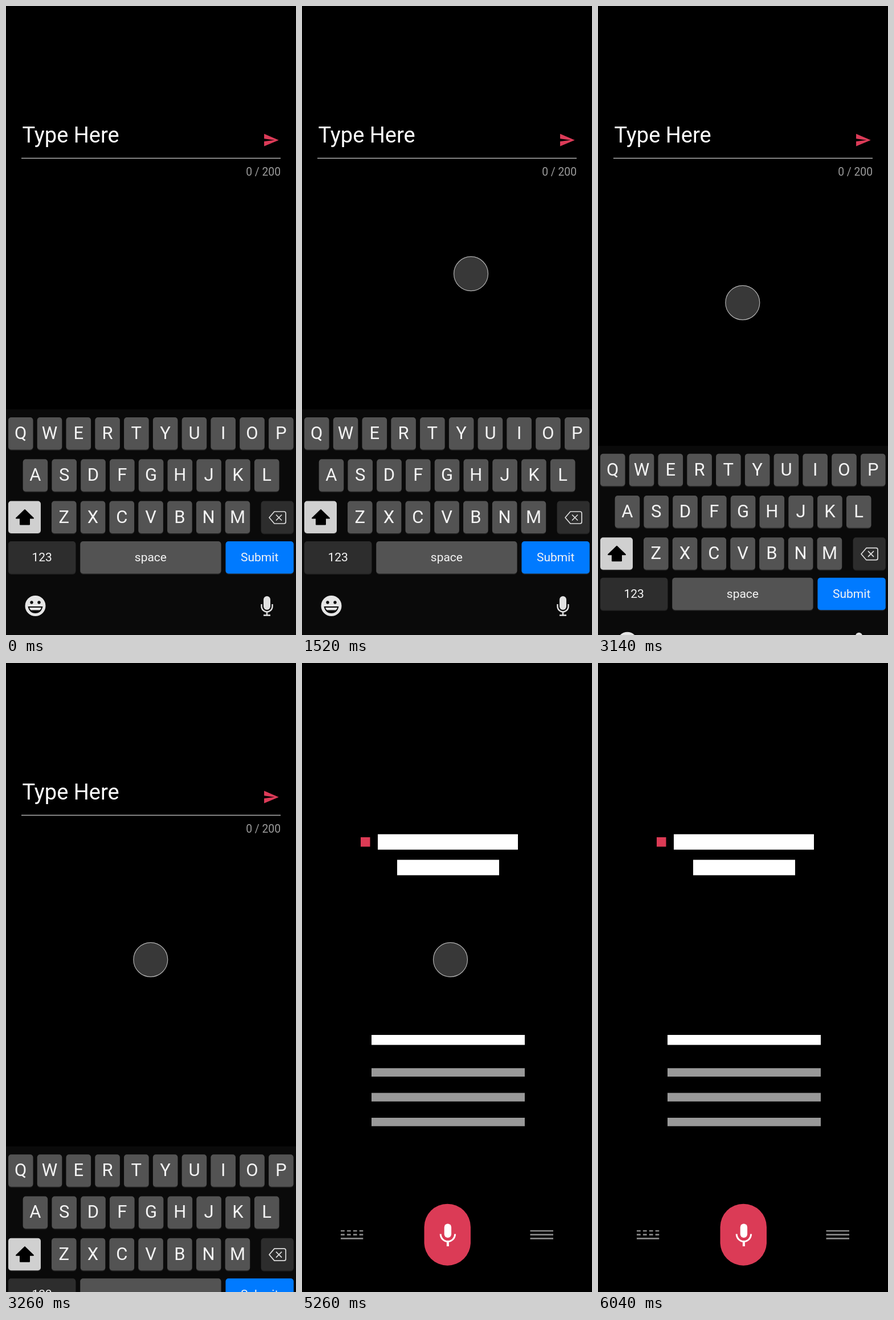
Recreate the animation shown at these times as an HTML page. Size 509 px wide and 1101 px high, loop 6.44 s.

```html
<!DOCTYPE html>
<html lang="en">
<head>
<meta charset="utf-8">
<title>Keyboard to voice input</title>
<style>
html, body { margin: 0; width: 100%; height: 100%; overflow: hidden; background: #000; }
svg { display: block; width: 509px; height: 1101px; font-family: Roboto, Arial, sans-serif; }
#keys text { text-anchor: middle; fill: #f4f4f4; }
.letter { font-size: 31px; }
.label { font-size: 21px; }
</style>
</head>
<body>
<svg viewBox="0 0 509 1101">
  <rect width="509" height="1101"/>

  <g id="typing">
    <text x="28.5" y="239" font-size="38" fill="#fff">Type Here</text>
    <path d="M27 266.5H482" stroke="#b0b0b0" stroke-width="1.3"/>
    <text x="482" y="297" font-size="19.3" fill="#9c9c9c" text-anchor="end">0 / 200</text>
    <path transform="translate(450.6 220) scale(1.22)" fill="#dc3b58" d="M2 21L23 12 2 3V10L17 12 2 14z"/>
    <g id="board">
      <rect y="706" width="509" height="395" fill="#0a0a0a"/>
      <g id="keys"></g>
      <path d="M33 882L48 896.5H41V907.5H25V896.5H18Z" stroke="#000" stroke-width="2" stroke-linejoin="round"/>
      <path d="M471 885H488Q491 885 491 888V903Q491 906 488 906H471L462 895.5ZM474 890.5L484 900.5M484 890.5L474 900.5"
        fill="none" stroke="#ddd" stroke-width="1.7" stroke-linejoin="round"/>
      <circle cx="51.5" cy="1050" r="18" fill="#e6e6e6"/>
      <g fill="#0a0a0a">
        <circle cx="45" cy="1044" r="2.7"/>
        <circle cx="58" cy="1044" r="2.7"/>
        <path d="M38.5 1051H64.5Q62 1063 51.5 1063T38.5 1051Z"/>
      </g>
      <path d="M41 1053H62Q61 1056.5 59 1057.5H44Q42 1056.5 41 1053Z" fill="#e6e6e6"/>
      <rect x="452" y="1033" width="12" height="24" rx="6" fill="#e2e2e2"/>
      <path d="M448.5 1047V1051A9.5 9.5 0 0 0 467.5 1051V1047M458 1060.5V1066M452 1066.5H464"
        fill="none" stroke="#e2e2e2" stroke-width="2.4"/>
    </g>
  </g>

  <g id="voice">
    <rect width="509" height="1101"/>
    <rect x="103" y="305" width="16.5" height="16.5" fill="#dc3b55"/>
    <g fill="#fff">
      <rect x="133" y="299.7" width="246" height="27"/>
      <rect x="167" y="344.5" width="179" height="27"/>
      <rect x="122" y="651" width="269" height="17.5"/>
    </g>
    <path d="M122 716.7H391M122 760H391M122 803.3H391" stroke="#999" stroke-width="14.8"/>
    <rect x="214.5" y="946.7" width="81.5" height="108" rx="40.7" fill="#db3b56"/>
    <rect x="249.7" y="981.5" width="12.4" height="24.5" rx="6.2" fill="#fff"/>
    <path d="M243.2 999.5A12.7 13 0 0 0 268.6 999.5" fill="none" stroke="#fff" stroke-width="3"/>
    <path d="M255.9 1012.5V1021" stroke="#fff" stroke-width="4"/>
    <g stroke="#888" stroke-width="2.7">
      <path d="M68 994H107.3M68 1000.6H107.3" stroke-dasharray="6.8 4.1"/>
      <path d="M68 1007.3H107.3M400.5 994H441M400.5 1000.6H441M400.5 1007.3H441"/>
    </g>
  </g>

  <circle id="touch" r="30" fill="#808080" fill-opacity=".44" stroke="#fff" stroke-opacity=".66" stroke-width="1.2"/>
</svg>
<script>
const LOOP = 6440, STEP = 20;
const $ = id => document.getElementById(id);
const clamp = v => Math.min(1, Math.max(0, v));

function key(x, y, w, fill, label = "", cls = "letter") {
  const ns = "http://www.w3.org/2000/svg";
  const add = (tag, attrs) => {
    const el = document.createElementNS(ns, tag);
    for (const k in attrs) el.setAttribute(k, attrs[k]);
    return $("keys").appendChild(el);
  };
  add("rect", { x, y: y + 1, width: w, height: 57, rx: 5, fill: "#222" });
  add("rect", { x, y, width: w, height: 56.5, rx: 5, fill });
  if (label) {
    const base = cls === "letter" ? 38 : 35;
    add("text", { x: x + w / 2, y: y + base, class: cls }).textContent = label;
  }
}

[["QWERTYUIOP", 4, 720], ["ASDFGHJKL", 29.7, 793.3], ["ZXCVBNM", 80, 866.5]].forEach(([row, x, y]) =>
  [...row].forEach((c, i) => key(x + i * 50.78, y, 43.5, "#535353", c)));
key(4, 866.5, 57, "#d0d0d0");
key(447.7, 866.5, 57, "#2d2d2d");
key(4, 937, 118.3, "#2d2d2d", "123", "label");
key(130.3, 937, 247.2, "#535353", "space", "label");
key(385.5, 937, 119.3, "#007aff", "Submit", "label");

// time, x, y, x speed, y speed (px per ms)
const enter = [
  [360, 464, -38, -.2, .72],
  [980, 363.7, 326.7, -.1, .46],
  [1020, 359.7, 344.7, -.11, .43],
  [1680, 279.7, 488.3, -.09, .12],
  [2160, 253.8, 520.7, 0, 0]
];
const leave = [
  [5240, 253.8, 519.3, .32, 0],
  [5260, 260.5, 519.3, .36, -.08],
  [5900, 481.5, 42, .28, -.6],
  [6040, 516, -34, .22, -.5]
];

function hermite(u, d, a, b, va, vb) {
  const w = 1 - u;
  return w * w * ((1 + 2 * u) * a + u * d * va) + u * u * ((3 - 2 * u) * b - w * d * vb);
}

function along(path, t) {
  const i = Math.max(1, path.findIndex(p => t <= p[0]));
  const a = path[i - 1], b = path[i], d = b[0] - a[0], u = clamp((t - a[0]) / d);
  return [1, 2].map(k => hermite(u, d, a[k], b[k], a[k + 2], b[k + 2]));
}

function touchAt(t) {
  if (t < 380 || t >= 6040) return [-99, -99];
  if (t <= 2160) return along(enter, t);
  if (t < 5260) return [253.8, t < 2640 ? 520.7 : t < 2880 ? 520.1 : 519.3];
  return along(leave, t);
}

function draw(t) {
  const slide = 395 * clamp((t - 3040) / 620);
  const fade = clamp((t - 3350) / 310);
  $("board").setAttribute("transform", `translate(0 ${slide})`);
  $("voice").setAttribute("opacity", fade);
  $("touch").setAttribute("transform", `translate(${touchAt(t)})`);
}

const start = performance.now();
function tick(now) {
  const t = Math.max(0, now - start) % LOOP;
  draw(Math.floor(t / STEP) * STEP);
  requestAnimationFrame(tick);
}
draw(0);
requestAnimationFrame(tick);
</script>
</body>
</html>
```
